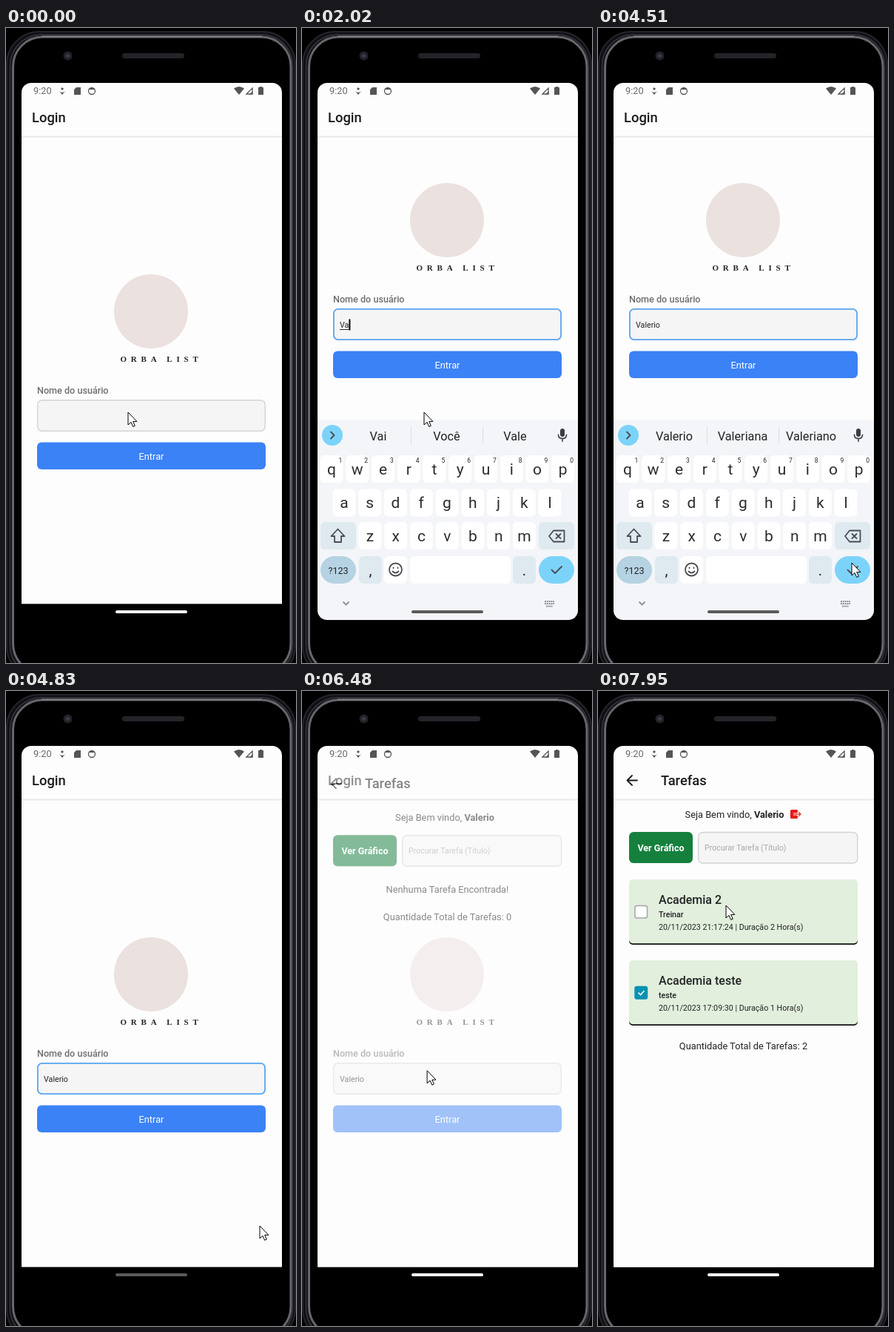
An HTML page for the animation above (8 s loop, 392 by 856 pixels).

```html
<!DOCTYPE html>
<html lang="pt-BR">
<head>
<meta charset="utf-8">
<title>Login e tarefas</title>
<style>
  html, body { margin: 0; width: 100%; height: 100%; overflow: hidden; background: #000; }
  svg { display: block; width: 100vw; height: 100vh; }
  text { font: 12.8px Roboto, sans-serif; fill: #232325; white-space: pre; }
  .mid { text-anchor: middle; }
  .title { font-size: 18.4px; font-weight: 500; fill: #1c1c1e; }
  .small { font-size: 10.7px; }
  .white { fill: #fff; }
  .line { fill: none; stroke: #4a4d52; stroke-width: 1.8; stroke-linecap: round; stroke-linejoin: round; }
  [data-letter] { fill: #2c2d30; opacity: var(--ink); }
</style>
</head>
<body>
<svg viewBox="0 0 392 856">
  <defs>
    <clipPath id="screen"><rect x="21" y="74" width="352" height="724" rx="13"/></clipPath>
    <clipPath id="page"><rect x="21" y="95" width="352" height="681.500"/></clipPath>
  </defs>

  <!-- phone body -->
  <g fill="none">
    <rect x="1" y="5" width="390" height="872" rx="44" fill="#0e0e14" stroke="#24242a" stroke-width="2"/>
    <rect x="5.500" y="9" width="382" height="865" rx="42" stroke="#303036" stroke-width="2"/>
    <rect x="9.500" y="12" width="375.500" height="858" rx="40" fill="#000" stroke="#66666c" stroke-width="3"/>
    <path d="M48 11.500H346" stroke="#86868c" stroke-width="1.500"/>
    <rect x="157" y="34" width="84" height="7" rx="3" fill="#232328"/>
    <circle cx="83.500" cy="37.500" r="6" fill="#222228"/>
    <circle cx="83.500" cy="37.500" r="2.500" fill="#3c3c46"/>
  </g>

  <g clip-path="url(#screen)">
    <path d="M21 74H373V776.500H21z" fill="#fdfdfd"/>
    <g fill="#555558">
      <text x="37" y="89" style="fill:#69696c">9:20</text>
      <path d="M76 80l2 2-2 2-2-2zM72 85q4 4 8 0l-4 5z"/>
      <path d="M95 80h6v10h-9v-7z"/>
      <circle cx="116" cy="85" r="4.500" fill="none" stroke="#555558" stroke-width="1.300"/>
      <path d="M112 83q4-5 8 0zM308 81.500q7-5 14 0l-7 8.500z"/>
      <path d="M325 89l8-8v8z" fill="none" stroke="#555558" stroke-width="1.300"/>
      <path d="M329 89.500l4.500-4.500v4.500zM341 80h2v-1h3v1h2v10h-7z"/>
    </g>

    <g clip-path="url(#page)">
      <g id="login">
        <text class="title" x="35" y="127">Login</text>
        <g id="form">
          <circle cx="196" cy="382" r="50" fill="#ebe1de"/>
          <text class="mid" x="210" y="450" style="font:bold 11px 'Liberation Serif',serif;letter-spacing:5.800px">ORBA LIST</text>
          <text x="42" y="493" style="fill:#6f6f72;font-weight:500;font-size:12.600px">Nome do usuário</text>
          <rect x="42.700" y="501.700" width="307.600" height="41.600" rx="6" fill="#f5f5f6" stroke="#d4d4d6" stroke-width="1.400"/>
          <rect id="focus" x="42.900" y="501.900" width="307.200" height="41.200" rx="6" fill="none" stroke="#5ba6f5" stroke-width="1.800"/>
          <text id="typed" class="small" x="51" y="527"></text>
          <path id="under" stroke="#333335"/>
          <rect id="caret" y="515.500" width="2" height="15" fill="#000"/>
          <rect x="42" y="558.500" width="309" height="36.500" rx="6" fill="#3b82f6"/>
          <rect id="press" x="42" y="558.500" width="309" height="36.500" rx="6" fill="#2563eb"/>
          <text class="mid white" x="196.500" y="582">Entrar</text>
        </g>
      </g>

      <g id="tasks">
        <path d="M21 95H373V777H21z" fill="#fdfdfd"/>
        <path class="line" d="M53 120.500H39.500m6.500-6.500l-6.500 6.500 6.500 6.500" style="stroke:#1c1c1e"/>
        <text class="title" x="85" y="127">Tarefas</text>
        <text id="hello" class="mid" y="171">Seja Bem vindo, <tspan id="who" font-weight="700"></tspan></text>
        <g id="exit">
          <rect x="260" y="160" width="10" height="12" rx="1.500" fill="#e51c1c"/>
          <path d="M264 166h9m-3-3l3 3-3 3" fill="none" stroke="#fff" stroke-width="3"/>
          <path d="M264 166h10m-3-3l3 3-3 3" fill="none" stroke="#e0482c" stroke-width="1.300"/>
        </g>
        <rect x="42" y="190" width="86" height="42" rx="6" fill="#15803d"/>
        <text class="mid white" x="85" y="216" style="font-weight:700;font-size:12.500px">Ver Gráfico</text>
        <rect x="135.700" y="190.500" width="215" height="41.500" rx="6" fill="#f5f5f6" stroke="#d4d4d6" stroke-width="1.400"/>
        <text class="small" x="144" y="215" style="fill:#a8a8aa">Procurar Tarefa (Título)</text>
        <text id="none" class="mid" x="196.500" y="268">Nenhuma Tarefa Encontrada!</text>
        <g id="cards"></g>
        <text id="total" class="mid" x="196.500"></text>
      </g>
      <path d="M21 146.500H373" stroke="#e9e9e6" stroke-width="2"/>
    </g>

    <g id="keyboard"></g>
    <rect id="scrim" x="21" y="776" width="352" height="22"/>
    <rect id="handle" x="148" y="785" width="97" height="4" rx="2"/>
  </g>
  <path id="cursor" d="M0 0V17l4-3.600 2.700 6 2.600-1.200-2.600-5.800h5.200z" fill="#fff" stroke="#000" stroke-linejoin="round"/>
</svg>

<script>
const LOOP = 8000, NAME = 'Valerio';
const TYPE_AT = [1490, 1700, 2060, 2380, 2520, 2740, 2960];
const FIRST_WORDS = ['Vai', 'Você', 'Vale'];
const WORDS = [NAME, 'Valeriana', 'Valeriano'];
const PATH = [
  [0, 165, 518], [2480, 165, 518], [2560, 166, 516], [3450, 166, 516],
  [4230, 325, 713], [4280, 325, 713], [4370, 343, 721], [5330, 343, 721],
  [5900, 199, 591], [6160, 199, 591], [6940, 118, 376], [6990, 118, 376],
  [7770, 146, 410], [7860, 230, 380], [7950, 173, 289]
];

const $ = id => document.getElementById(id);
const set = (id, name, value) => $(id).setAttribute(name, value);
const show = (id, on) => set(id, 'opacity', +on);
const write = (node, s) => { if (node.textContent !== s) node.textContent = s; };
const ramp = (t, a, b) => Math.min(1, Math.max(0, (t - a) / (b - a)));
const smooth = p => p * p * (3 - 2 * p);

const label = (x, y, s, size, attr = '', weight = 400) =>
  `<text class="mid" x="${x}" y="${y}" style="font-size:${size}px;font-weight:${weight}" ${attr}>${s}</text>`;
const key = (x, y, w, fill = '#fff', r = 6) =>
  `<rect x="${x}" y="${y}" width="${w}" height="37" rx="${r}" fill="${fill}"/>`;
const line = d => `<path class="line" d="${d}"/>`;
const row = (chars, x, y) => [...chars].map((c, i) => {
  const cx = x + i * 34.75;
  return key(cx - 15.5, y, 31) + label(cx, y + 25.5, c, 21, 'data-letter');
}).join('');

function keyboardMarkup() {
  const pale = '#dfe9f0', cyan = '#7cd3fa';
  const hints = [...'1234567890'].map((c, i) => label(52 + i * 34.75, 586, c, 8.5)).join('');
  const tools = `<g id="tools"><circle cx="41" cy="548" r="14" fill="#b0def8"/>` +
    line('M43 543.500l-4.500 4.500 4.500 4.500') +
    line('M84 541h14v9l-5 5h-9zM98 550h-5v5M88 545v1M94 545v1M88 549q3 3 5 0') +
    label(141, 552, 'GIF', 12, '', 900) +
    line('M184 542.500h13v13h-13zM188 541h5v3h-5zM187 547.500h7M187 551h5') +
    `<circle class="line" cx="239.500" cy="548" r="4" style="stroke-width:3.500"/>
     <circle class="line" cx="239.500" cy="548" r="6.500" style="stroke-width:2;stroke-dasharray:2.800 4;stroke-linecap:butt"/>` +
    [296, 301, 306].map(x => `<circle cx="${x}" cy="548" r="1.600" fill="#4a4d52"/>`).join('') + '</g>';
  const words = `<g id="words"><circle cx="41" cy="549" r="14" fill="${cyan}"/>` +
    line('M39 544.500l4.500 4.500-4.500 4.500') +
    `<path d="M147.500 537v24M244.500 537v24" stroke="#dcdfe3"/>` +
    [103, 195.5, 288].map(x => label(x, 556, '', 16.3, 'data-word')).join('') + '</g>';
  const mic = `<rect x="349" y="540" width="6" height="11" rx="3" fill="#3a3c40"/>` +
    line('M346.500 548.500q0 5 5.500 5t5.500-5M352 554v3');
  const bottom = key(25, 712, 48, '#b5d3e2', 18.5) + label(49, 735.5, '?123', 12.5) +
    key(77, 712, 31, pale) + label(92.5, 738, ',', 20) +
    key(111, 712, 31) + `<circle class="line" cx="126.500" cy="730" r="8.500"/>` +
    line('M123.500 727.500v.5M129.500 727.500v.5M122.500 732.500q4 4 8 0') +
    key(146, 712, 136) + key(285, 712, 31, pale) + label(300.5, 738, '.', 20) +
    key(320, 712, 48, cyan, 18.5) +
    `<rect id="enter" x="320" y="712" width="48" height="37" rx="18.500" fill="#56afd8"/>` +
    line('M337.500 730.500l4.500 4.500 9-9');
  return `<path d="M21 528H373V798H21z" fill="#f3f5f8"/>` + tools + words + mic +
    row('QWERTYUIOP', 40, 576) + hints + row('ASDFGHJKL', 57, 621.5) +
    key(25, 666, 48, pale) + row('ZXCVBNM', 92, 666) + key(320, 666, 48, pale) +
    `<path id="shift" class="line" d="M48.500 675.500l9 9.500h-4.500v8h-9v-8h-4.500z"/>` +
    line('M340 677.500h14.500v15H340l-6-7.500zM343.500 682l6 6M349.500 682l-6 6') + bottom +
    `<g opacity=".6">${line('M56 774l3.500 3.500 3.500-3.500')}
     <path d="M328 773h13M328 776h13M330 779.500h9" stroke="#4a4d52" stroke-width="1.800" stroke-dasharray="2 .8"/></g>`;
}

const card = (y, title, note, date, done) => `<g transform="translate(0 ${y})">
  <rect x="42" y="10" width="309" height="78" rx="5" fill="#111113"/>
  <rect x="42" width="309" height="86.300" rx="5" fill="#e1efdc"/>
  <rect x="50" y="35.500" width="16.500" height="16.500" rx="2.500" fill="${done ? '#0891b2' : '#fff'}" stroke="${done ? '#0891b2' : '#a5a5a8'}" stroke-width="1.500"/>
  ${done ? '<path d="M54.500 43.500l3 3 5-5.500" fill="none" stroke="#fff" stroke-width="1.600"/>' : ''}
  <text x="82" y="33" style="font-size:16px;font-weight:500">${title}</text>
  <text x="82" y="51" style="font-size:10.600px;font-weight:500">${note}</text>
  <text x="82" y="67.500" class="small">${date}</text></g>`;

$('keyboard').innerHTML = keyboardMarkup();
$('cards').innerHTML =
  card(254, 'Academia 2', 'Treinar', '20/11/2023 21:17:24 | Duração 2 Hora(s)', false) +
  card(363, 'Academia teste', 'teste', '20/11/2023 17:09:30 | Duração 1 Hora(s)', true);
$('who').textContent = NAME;
const letters = document.querySelectorAll('[data-letter]');
const wordSlots = document.querySelectorAll('[data-word]');

function cursorAt(t) {
  const next = PATH.findIndex(p => p[0] > t);
  if (next < 0) return PATH[PATH.length - 1].slice(1);
  const [a, x, y] = PATH[next - 1], [b, x2, y2] = PATH[next];
  const p = smooth(ramp(t, a, b));
  return [x + (x2 - x) * p, y + (y2 - y) * p];
}

function drawForm(t, count) {
  const raised = t >= 1150 && t < 4560;
  set('form', 'transform', `translate(0 ${raised ? -123 : 0})`);
  set('focus', 'opacity', ramp(t, 550, 830) * (1 - ramp(t, 4860, 5200)));
  set('press', 'opacity', ramp(t, 5930, 6000) * (1 - ramp(t, 6060, 6140)));

  write($('typed'), NAME.slice(0, count));
  const end = 51 + (count ? $('typed').getComputedTextLength() : 0);
  set('under', 'd', `M51 529.500H${end}`);
  show('under', count > 0 && t < 4400);
  const since = t - (count ? TYPE_AT[count - 1] : 650);
  set('caret', 'x', end);
  show('caret', t >= 650 && t < 4510 && since % 1000 < 500);
}

function drawKeyboard(t, count) {
  const drop = t < 4520
    ? 270 * (1 - ramp(t, 1129, 1489)) ** 5
    : 270 * ramp(t, 4520, 4800) ** 2;
  set('keyboard', 'transform', `translate(0 ${drop})`);
  show('keyboard', t >= 1150 && t < 4800);
  $('keyboard').style.setProperty('--ink', .7 + .3 * ramp(t, 1200, 1480));

  const lower = count > 0;
  for (const k of letters) {
    const c = k.textContent;
    write(k, lower ? c.toLowerCase() : c.toUpperCase());
  }
  $('shift').style.fill = lower ? 'none' : '#4a4d52';
  const swap = ramp(t, 1660, 1760);
  set('tools', 'opacity', 1 - swap);
  set('words', 'opacity', swap);
  const list = count < 3 ? FIRST_WORDS : WORDS;
  wordSlots.forEach((slot, i) => write(slot, list[i]));
  show('enter', t >= 4280 && t < 4420);

  set('scrim', 'opacity', .4 * (1 - ramp(t, 1300, 1480)));
  const dark = ramp(t, 1300, 1450) * (1 - ramp(t, 5380, 5500));
  const tone = 250 - 160 * dark;
  set('handle', 'fill', `rgb(${tone},${tone},${tone})`);
}

function drawTasks(t) {
  const p = ramp(t, 6350, 6600);
  set('tasks', 'opacity', p);
  set('tasks', 'transform', `translate(0 ${40 * (1 - p) ** 3})`);
  const loaded = t >= 7200;
  set('hello', 'x', loaded ? 184.5 : 193);
  show('exit', loaded);
  show('cards', loaded);
  show('none', !loaded);
  set('total', 'y', loaded ? 483 : 305);
  write($('total'), `Quantidade Total de Tarefas: ${loaded ? 2 : 0}`);
}

function frame() {
  const t = performance.now() % LOOP;
  const count = TYPE_AT.filter(at => at <= t).length;
  drawForm(t, count);
  drawKeyboard(t, count);
  drawTasks(t);
  set('cursor', 'transform', `translate(${cursorAt(t)})`);
  requestAnimationFrame(frame);
}
frame();
</script>
</body>
</html>
```
